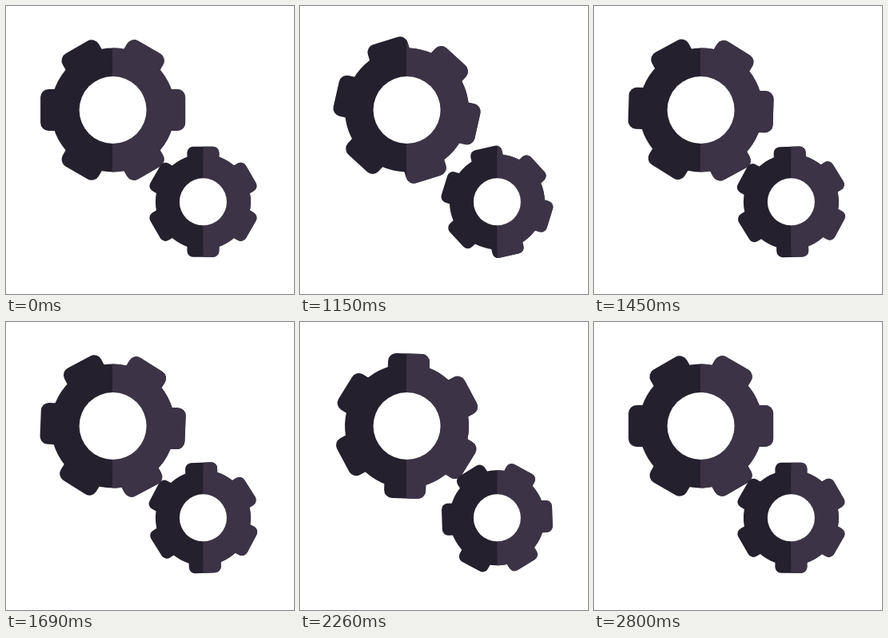
Write an HTML page that moves like this. It is 360x360 px and loops after 2830 ms.

```html
<!DOCTYPE html>
<html lang="en">
<head>
<meta charset="utf-8">
<title>Turning gears</title>
<style>
  html, body { margin: 0; width: 100%; height: 100%; overflow: hidden; background: #fff; }
  svg { display: block; width: 100vw; height: 100vh; }
</style>
</head>
<body>
<svg id="stage" viewBox="0 0 360 360"></svg>
<script>
const LOOP = 2830;
const STEP = 30;
const TURN_STARTS = [1000, 2000];
const SWING = 1600 / 3;   // time to reach the overshoot
const SETTLE = 800 / 3;   // time to fall back to rest
const PEAK = 66;
const REST = 60;
const DARK = '#25202d';
const LIGHT = '#3c3446';

const stage = document.getElementById('stage');

function add(parent, tag, attrs) {
  const node = document.createElementNS('http://www.w3.org/2000/svg', tag);
  for (const name in attrs) node.setAttribute(name, attrs[name]);
  return parent.appendChild(node);
}

// A ring with six rounded teeth; the two-tone shading stays upright while the outline turns.
function makeGear({ id, x, y, split, ring, hole, reach, half, corner, tilt, dir }) {
  const clip = add(stage, 'clipPath', { id });
  add(clip, 'rect', { x: split, y: 0, width: 360, height: 360 });

  function drawBody(parent, fill) {
    const body = add(parent, 'g', { fill });
    add(body, 'circle', { r: ring });
    for (let i = 0; i < 6; i++) {
      add(body, 'rect', {
        x: ring / 2, y: -half, width: reach - ring / 2, height: 2 * half,
        rx: corner, transform: `rotate(${tilt + 60 * i})`
      });
    }
    return body;
  }

  const bodies = [
    drawBody(stage, DARK),
    drawBody(add(stage, 'g', { 'clip-path': `url(#${id})` }), LIGHT)
  ];
  add(stage, 'circle', { cx: x, cy: y, r: hole, fill: '#fff' });

  return angle => bodies.forEach(body =>
    body.setAttribute('transform', `translate(${x} ${y}) rotate(${dir * angle})`));
}

const gears = [
  makeGear({ id: 'bigLight', x: 133.6, y: 130, split: 133, ring: 77.5, hole: 42,
             reach: 90.5, half: 26, corner: 10, tilt: 0, dir: 1 }),
  makeGear({ id: 'smallLight', x: 246.4, y: 244.8, split: 246.5, ring: 59.5, hole: 29.5,
             reach: 69, half: 20, corner: 7.5, tilt: 30, dir: -1 })
];

function ease(p) {
  p = Math.min(1, Math.max(0, p));
  return p * p * (3 - 2 * p);
}

function turn(t) {
  return PEAK * ease(t / SWING) - (PEAK - REST) * ease((t - SWING) / SETTLE);
}

function render(ms) {
  const t = 10 + STEP * Math.floor((ms % LOOP - 10) / STEP);
  const angle = TURN_STARTS.reduce((sum, start) => sum + turn(t - start), 0);
  gears.forEach(setAngle => setAngle(angle));
}

const begin = performance.now();
function tick() {
  render(performance.now() - begin);
  requestAnimationFrame(tick);
}
tick();
</script>
</body>
</html>
```
